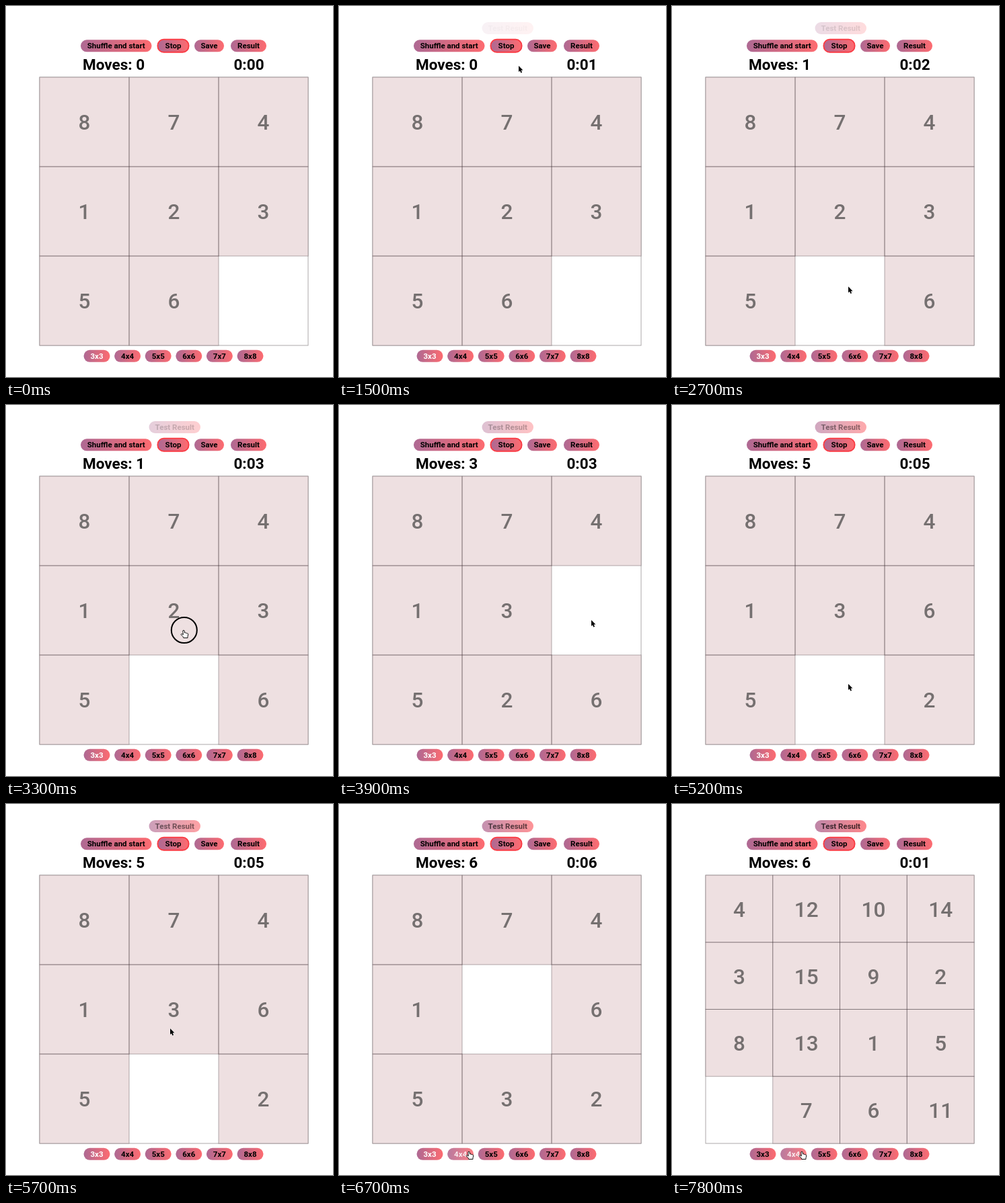
Recreate the animation shown at these times as an HTML page with a canvas. Size 486x552 px, loop 8000 ms.

```html
<!DOCTYPE html>
<html lang="en">
<head>
<meta charset="utf-8">
<title>Sliding puzzle</title>
<style>
  html, body { margin: 0; width: 100%; height: 100%; overflow: hidden; background: #fff; }
  canvas { display: block; }
</style>
</head>
<body>
<canvas id="stage" width="486" height="552"></canvas>
<script>
const ctx = document.getElementById('stage').getContext('2d');
const LOOP = 8000;
const BOARD = { x: 50, y: 106, size: 399 };
const SMALL = '8 7 4 1 2 3 5 6 0'.split(' ').map(Number);
const LARGE = '4 12 10 14 3 15 9 2 8 13 1 5 0 7 6 11'.split(' ').map(Number);

const stop = (time, x, y) => ({ time, x, y });
const rest = [stop(300, 150, 57), stop(1750, 267, 89)];
const tileClicks = [
  stop(2500, 262, 420), stop(3400, 264, 335), stop(3900, 375, 320),
  stop(4500, 391, 400), stop(5100, 262, 415), stop(5900, 244, 334),
];
const resize = stop(6850, 193, 517);
const clicks = [...tileClicks, resize];
const stops = [...rest, ...clicks];

function label(text, x, y, size, { weight = 600, color = '#000', align = 'center' } = {}) {
  ctx.font = `${weight} ${size}px Roboto, "Open Sans", sans-serif`;
  ctx.fillStyle = color;
  ctx.textAlign = align;
  ctx.fillText(text, x, y + size * 0.355);
}

function button(text, x, y, w, { color = '#000', alpha = 1, ring = false } = {}) {
  const h = 18;
  const fill = ctx.createLinearGradient(x, 0, x + w, 0);
  fill.addColorStop(0, '#ae6993');
  fill.addColorStop(1, '#fd6b70');
  ctx.save();
  ctx.globalAlpha = alpha;
  ctx.fillStyle = fill;
  ctx.beginPath();
  ctx.roundRect(x, y, w, h, h / 2);
  ctx.fill();
  if (ring) {
    ctx.beginPath();
    ctx.roundRect(x - 0.5, y - 0.5, w + 1, h + 1, h / 2);
    ctx.strokeStyle = '#f93a43';
    ctx.lineWidth = 2;
    ctx.stroke();
  }
  ctx.globalAlpha = alpha ** 1.5;
  label(text, x + w / 2, y + h / 2, 11.5, { color });
  ctx.restore();
}

const smooth = p => p * p * (3 - 2 * p);
const clamp = p => Math.min(1, Math.max(0, p));

// Solves the CSS "ease" curve
function ease(p) {
  const curve = (s, a, b) => 3 * s * (1 - s) ** 2 * a + 3 * s * s * (1 - s) * b + s ** 3;
  let lo = 0, hi = 1;
  for (let i = 0; i < 20; i++) {
    const mid = (lo + hi) / 2;
    if (curve(mid, 0.25, 0.25) < p) lo = mid; else hi = mid;
  }
  return curve(lo, 0.1, 1);
}

// Each click slides the tile under the pointer into the gap
function tilesAt(t) {
  if (t >= resize.time) return LARGE;
  const tiles = SMALL.slice(), cell = BOARD.size / 3;
  for (const { x, y } of tileClicks.filter(c => t >= c.time)) {
    const from = Math.floor((x - BOARD.x) / cell) + 3 * Math.floor((y - BOARD.y) / cell);
    tiles[tiles.indexOf(0)] = tiles[from];
    tiles[from] = 0;
  }
  return tiles;
}

function drawBoard(tiles) {
  const n = Math.sqrt(tiles.length), cell = BOARD.size / n;
  const eachTile = paint => tiles.forEach((value, i) => {
    if (value) paint(BOARD.x + (i % n) * cell, BOARD.y + Math.floor(i / n) * cell, value);
  });
  ctx.lineWidth = 1;
  ctx.strokeStyle = '#aca8a9';
  ctx.strokeRect(BOARD.x, BOARD.y, BOARD.size, BOARD.size);
  eachTile((x, y, value) => {
    ctx.fillStyle = '#eee0e1';
    ctx.fillRect(x, y, cell, cell);
    label(value, x + cell / 2, y + cell / 2 + 0.8, 31.5, { weight: 500, color: '#757070' });
  });
  ctx.strokeStyle = 'rgba(70, 58, 61, 0.4)';
  eachTile((x, y) => ctx.strokeRect(x, y, cell, cell));
}

// Glides between stops, waiting a moment around each one
function pointerAt(t) {
  let { x, y } = stops[0];
  for (let i = 1; i < stops.length; i++) {
    const depart = stops[i - 1].time + 150, arrive = stops[i].time - 250;
    const s = smooth(clamp((t - depart) / (arrive - depart)));
    x += (stops[i].x - x) * s;
    y += (stops[i].y - y) * s;
  }
  return [x, y];
}

const arrow = new Path2D('M0 0V9L2 7.2L3.4 10.4L5 9.7L3.6 6.6H6.4Z');
const hand = new Path2D('M-1.2 .8Q0 -.6 1.1 .8L1.6 4Q3 3.2 3.6 4.4Q5 3.8 5.4 5Q6.8 4.8 6.8 6.2' +
  'L6 9.6V11.5H-.2L-1 9.6L-4 6.6Q-3.6 5 -2 5.8L-.7 6.8Z');

function drawPointer(t) {
  if (t < stops[0].time) return;
  const within = lead => clicks.some(({ time }) => t >= time - lead && t < time);
  const isHand = within(160) || t >= resize.time;
  ctx.save();
  ctx.translate(...pointerAt(t));
  if (within(120)) {
    ctx.beginPath();
    ctx.arc(0.8, 0, 19, 0, Math.PI * 2);
    ctx.strokeStyle = '#000';
    ctx.lineWidth = 2;
    ctx.stroke();
  }
  const shape = isHand ? hand : arrow;
  ctx.lineJoin = 'round';
  ctx.lineWidth = 1;
  ctx.strokeStyle = isHand ? '#111' : '#fff';
  ctx.fillStyle = isHand ? '#fff' : '#000';
  ctx.fill(shape);
  ctx.stroke(shape);
  if (!isHand) ctx.fill(shape);
  ctx.restore();
}

function draw(t) {
  ctx.fillStyle = '#fff';
  ctx.fillRect(0, 0, 486, 552);

  button('Test Result', 212.5, 24, 76.5, { alpha: ease(t / 15500) });
  button('Shuffle and start', 111, 50.3, 105.5);
  button('Stop', 226, 50.3, 45, { ring: true });
  button('Save', 280, 50.3, 44);
  button('Result', 334, 50.3, 53);

  const resized = t >= resize.time;
  const count = tileClicks.filter(c => t >= c.time).length;
  const seconds = Math.max(0, Math.floor(resized ? (t - resize.time + 150) / 1000 : (t - 50) / 1000));
  label(`Moves: ${count}`, 114, 87.5, 22.5, { align: 'left' });
  label(`0:0${seconds}`, 361, 87.5, 22.5);

  drawBoard(tilesAt(t));

  for (let n = 3; n <= 8; n++) {
    const hover = n === 4 && t >= resize.time - 400;
    const selected = n === (resized ? 4 : 3);
    button(`${n}x${n}`, 115.5 + (n - 3) * 45.6, 511.8, 39,
      { color: hover || selected ? '#fff' : '#000', alpha: hover ? 0.88 : 1 });
  }
  drawPointer(t);
}

function frame() {
  draw(performance.now() % LOOP);
  requestAnimationFrame(frame);
}
frame();
</script>
</body>
</html>
```
